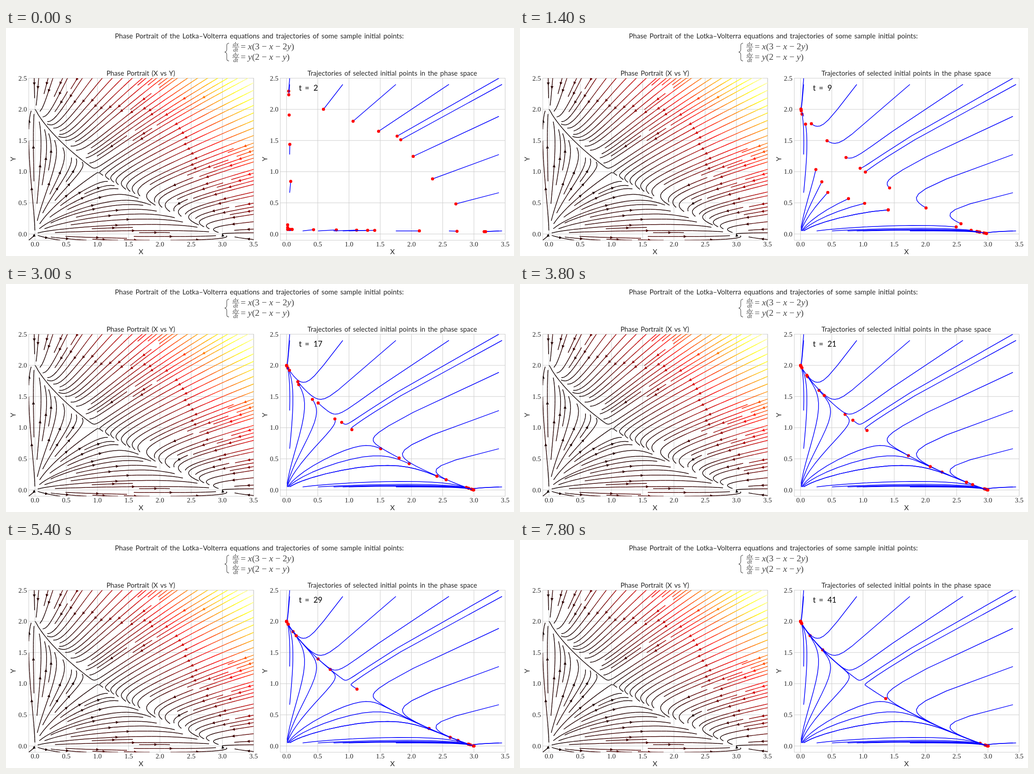
An HTML page for the animation above (8 s loop, 1116 by 502 pixels).

```html
<!DOCTYPE html>
<html lang="en">
<head>
<meta charset="utf-8">
<title>Phase portrait</title>
<style>
  html, body { margin: 0; width: 100%; height: 100%; overflow: hidden; background: #fff; }
  svg { display: block; width: 1116px; height: 502px; }
  text { fill: #262626; font-family: Lato, "Open Sans", sans-serif; word-spacing: .12em; }
  .num, .math { font-family: "Liberation Serif", "Noto Serif", serif; word-spacing: 0; }
  .num { font-size: 15px; }
  .math { fill: #444; font-size: 19.8px; }
  .small { font-size: 13.5px; }
  .it { font-style: italic; }
</style>
</head>
<body>
<svg id="stage" viewBox="0 0 1116 502"></svg>
<script>
const svg = document.getElementById('stage');
const UNIT = 137.22, TOP = 110.5, W = 494, H = 356.8;
const LEFT = 50, RIGHT = 602.6;
const LOOP = 8000, STEP = 200, FRAMES = 40, DT = 10 / 49;

function add(tag, attrs, parent = svg, text) {
  const el = document.createElementNS('http://www.w3.org/2000/svg', tag);
  for (const k in attrs) el.setAttribute(k, attrs[k]);
  if (text !== undefined) el.textContent = text;
  parent.appendChild(el);
  return el;
}
const label = (x, y, size, text, anchor = 'middle') =>
  add('text', { x, y, 'font-size': size, 'text-anchor': anchor }, svg, text);

const px = (left, x) => left + (x + 0.1) * UNIT;
const py = y => TOP + (2.5 - y) * UNIT;
const flow = (x, y) => [x * (3 - x - 2 * y), y * (2 - x - y)];

// ---------- axes ----------
function axes(left, title) {
  const grid = add('g', { stroke: '#ccc', 'stroke-width': 1, fill: 'none' });
  const num = (x, y, v, anchor) =>
    add('text', { x, y, class: 'num', 'text-anchor': anchor }, svg, v.toFixed(1));
  for (let v = 0; v <= 3.5; v += 0.5) {
    const x = px(left, v), y = py(v);
    add('path', { d: `M${x} ${TOP}v${H}` }, grid);
    num(x, 481, v, 'middle');
    if (v > 2.5) continue;
    add('path', { d: `M${left} ${y}h${W}` }, grid);
    num(left - 4, y + 5, v, 'end');
  }
  add('rect', { x: left, y: TOP, width: W, height: H }, grid);
  label(left + W / 2 - 1, 104.5, 14.9, title);
  label(left + W / 2 - 0.5, 498, 15.5, 'X');
  add('text', { 'font-size': 15.5, 'text-anchor': 'middle',
    transform: `translate(${left - 29} 288.5) rotate(-90)` }, svg, 'Y');
}

// ---------- streamlines on an occupancy mask ----------
const CELLS = 45, MAX_LENGTH = 4, MIN_LENGTH = 0.1, MAX_ERROR = 0.003;
const LOW = -0.1, SPAN_X = 3.7, SPAN_Y = 2.7;
const mask = new Uint8Array(CELLS * CELLS);
const inside = (x, y) => x >= 0 && x <= 1 && y >= 0 && y <= 1;
const cell = (x, y) => Math.floor(x * (CELLS - 1) + 0.5) + CELLS * Math.floor(y * (CELLS - 1) + 0.5);
const toData = (x, y) => [LOW + x * SPAN_X, LOW + y * SPAN_Y];

// unit direction in box coordinates, null outside the box or at rest
function heading(x, y, sign) {
  if (!inside(x, y)) return null;
  const [u, v] = flow(...toData(x, y));
  const a = u / SPAN_X, b = v / SPAN_Y, s = Math.hypot(a, b);
  return s ? [sign * a / s, sign * b / s] : null;
}

function walk(x, y, sign, used) {
  const pts = [], maxStep = 1 / CELLS;
  let ds = maxStep, total = 0, current = cell(x, y);
  while (true) {
    pts.push([x, y]);
    const k1 = heading(x, y, sign);
    if (!k1) break;
    const k2 = heading(x + ds * k1[0], y + ds * k1[1], sign);
    if (!k2) {
      const reach = (p, c) => c === 0 ? Infinity : c < 0 ? -p / c : (1 - p) / c;
      const end = Math.min(reach(x, k1[0]), reach(y, k1[1]));
      pts.push([x + end * k1[0], y + end * k1[1]]);
      total += end;
      break;
    }
    const error = ds / 2 * Math.hypot(k2[0] - k1[0], k2[1] - k1[1]);
    let moved = false;
    if (error < MAX_ERROR) {
      x += ds / 2 * (k1[0] + k2[0]);
      y += ds / 2 * (k1[1] + k2[1]);
      if (!inside(x, y)) break;
      const c = cell(x, y);
      if (c !== current) {
        if (mask[c]) break;
        mask[c] = 1;
        used.push(c);
        current = c;
      }
      if (total + ds > MAX_LENGTH) break;
      total += ds;
      moved = true;
    }
    ds = error ? Math.min(maxStep, 0.85 * ds * Math.sqrt(MAX_ERROR / error)) : maxStep;
    if (!moved) pts.pop();
  }
  return { pts, total };
}

function streamline(x, y) {
  const used = [cell(x, y)];
  mask[used[0]] = 1;
  const back = walk(x, y, -1, used), ahead = walk(x, y, 1, used);
  if (back.total + ahead.total > MIN_LENGTH)
    return back.pts.reverse().concat(ahead.pts.slice(1));
  used.forEach(c => mask[c] = 0);
  return null;
}

// cells visited in an inward spiral from the lower left corner
function* spiral(n) {
  let x0 = 0, y0 = 1, x1 = n - 1, y1 = n - 1, x = 0, y = 0, dir = 0;
  for (let i = 0; i < n * n; i++) {
    yield [x, y];
    if (dir === 0) { if (++x >= x1) { x1--; dir = 1; } }
    else if (dir === 1) { if (++y >= y1) { y1--; dir = 2; } }
    else if (dir === 2) { if (--x <= x0) { x0++; dir = 3; } }
    else if (--y <= y0) { y0++; dir = 0; }
  }
}

const speed = (x, y) => Math.hypot(...flow(...toData(x, y)));
const topSpeed = speed(1, 1);
function heat(x, y) {
  const s = speed(x, y) / topSpeed;
  const ramp = (a, b) => Math.round(255 * Math.min(1, Math.max(0, (s - a) / (b - a))));
  return `rgb(${ramp(-0.0158, 0.365)},${ramp(0.365, 0.746)},${ramp(0.746, 1)})`;
}

function drawStream(pts, lines, arrows) {
  const p = pts.map(([x, y]) => toData(x, y)).map(([x, y]) => [px(LEFT, x), py(y)]);
  const sums = [];
  let sum = 0;
  for (let i = 0; i + 1 < p.length; i++) {
    const [x, y] = p[i], [x2, y2] = p[i + 1];
    add('path', { d: `M${x.toFixed(2)} ${y.toFixed(2)}L${x2.toFixed(2)} ${y2.toFixed(2)}`,
      stroke: heat(...pts[i]) }, lines);
    sums.push(sum += Math.hypot(x2 - x, y2 - y));
  }
  const n = sums.findIndex(s => s >= sum / 2);
  const [a, b] = [p[n], p[n + 1]], color = heat(...pts[n]);
  const turn = Math.atan2(b[1] - a[1], b[0] - a[0]) * 180 / Math.PI;
  add('path', { d: 'M-1 0l-4 -2v4z', fill: color, stroke: color,
    transform: `translate(${(a[0] + b[0]) / 2} ${(a[1] + b[1]) / 2}) rotate(${turn})` }, arrows);
}

function phasePortrait() {
  const box = add('g', { 'stroke-width': 1.5, 'clip-path': 'url(#boxL)' });
  const lines = add('g', {}, box), arrows = add('g', {}, box);
  for (const [i, j] of spiral(CELLS)) {
    if (mask[i + CELLS * j]) continue;
    const pts = streamline(i / (CELLS - 1), j / (CELLS - 1));
    if (pts) drawStream(pts, lines, arrows);
  }
}

// ---------- trajectories ----------
function solve([x, y]) {
  const pts = [], sub = 40, h = DT / sub;
  for (let i = 0; i <= FRAMES; i++) {
    pts.push(px(RIGHT, x).toFixed(2) + ' ' + py(y).toFixed(2));
    for (let k = 0; k < sub; k++) {
      const a = flow(x, y);
      const b = flow(x + h / 2 * a[0], y + h / 2 * a[1]);
      const c = flow(x + h / 2 * b[0], y + h / 2 * b[1]);
      const d = flow(x + h * c[0], y + h * c[1]);
      x += h / 6 * (a[0] + 2 * b[0] + 2 * c[0] + d[0]);
      y += h / 6 * (a[1] + 2 * b[1] + 2 * c[1] + d[1]);
    }
  }
  return pts;
}

function starts() {
  const five = [0, 1, 2, 3, 4];
  const ys = five.map(i => 0.05 + 0.6125 * i), xs = five.map(i => 0.05 + 0.85 * i);
  return [
    [0.01, 0.1], [0.01, 0.07], [0.02, 0.05], [0.03, 0.05],
    ...five.map(i => [0.01 + 0.2475 * i, 0.05]),
    ...ys.map(y => [0.05, y]), ...ys.map(y => [3.4, y]),
    ...xs.map(x => [x, 0.05]), ...xs.map(x => [x, 2.4])
  ];
}

// ---------- heading ----------
function equation(y, top, rhs) {
  const part = (x, dy, cls, text, anchor) =>
    add('text', { x, y: y + dy, class: 'math ' + cls, 'text-anchor': anchor }, svg, text);
  part(504.5, -7, 'small it', top, 'middle');
  part(504.5, 5, 'small it', 'dt', 'middle');
  add('path', { d: `M497 ${y - 4.5}h15.5`, stroke: '#444', 'stroke-width': 0.8 });
  const line = part(515.5, 0, '', '', 'start');
  for (const ch of rhs)
    add('tspan', /[xy]/.test(ch) ? { class: 'it' } : {}, line, ch);
}

const defs = add('defs', {});
for (const [id, x] of [['boxL', LEFT], ['boxR', RIGHT]])
  add('rect', { x, y: TOP, width: W, height: H }, add('clipPath', { id }, defs));

label(556.5, 22.5, 15.2,
  'Phase Portrait of the Lotka–Volterra equations and trajectories of some sample initial points:');
add('path', { d: 'M490 33.5q-5 0 -5 5v8.5q0 5 -4.5 6q4.5 1 4.5 6v8.5q0 5 5 5',
  fill: 'none', stroke: '#444', 'stroke-width': 1.1 });
equation(46.5, 'dx', '= x(3 − x − 2y)');
equation(69.5, 'dy', '= y(2 − x − y)');
axes(LEFT, 'Phase Portrait (X vs Y)');
axes(RIGHT, 'Trajectories of selected initial points in the phase space');
phasePortrait();

const plot = add('g', { 'clip-path': 'url(#boxR)' });
const tracks = starts().map(p => ({
  pts: solve(p),
  line: add('path', { fill: 'none', stroke: '#00f', 'stroke-width': 1.5, 'stroke-linejoin': 'round' }, plot),
  dot: add('circle', { r: 3.4, fill: '#f00' }, plot)
}));
const clock = add('text', { y: 137.5, 'font-size': 17, style: 'fill:#000' });
add('tspan', { x: 643.5 }, clock, 't');
add('tspan', { x: 656.5 }, clock, '=');
const count = add('tspan', { x: 675.5 }, clock, '');

let shown = -1;
function render(ms) {
  const t = 2 + Math.floor((ms % LOOP) / STEP);
  if (t === shown) return;
  shown = t;
  count.textContent = t;
  for (const { pts, line, dot } of tracks) {
    line.setAttribute('d', 'M' + pts.slice(0, t).join('L'));
    const [x, y] = pts[t - 1].split(' ');
    dot.setAttribute('cx', x);
    dot.setAttribute('cy', y);
  }
}

const origin = performance.now();
function tick() {
  render(performance.now() - origin);
  requestAnimationFrame(tick);
}
render(0);
tick();
</script>
</body>
</html>
```
